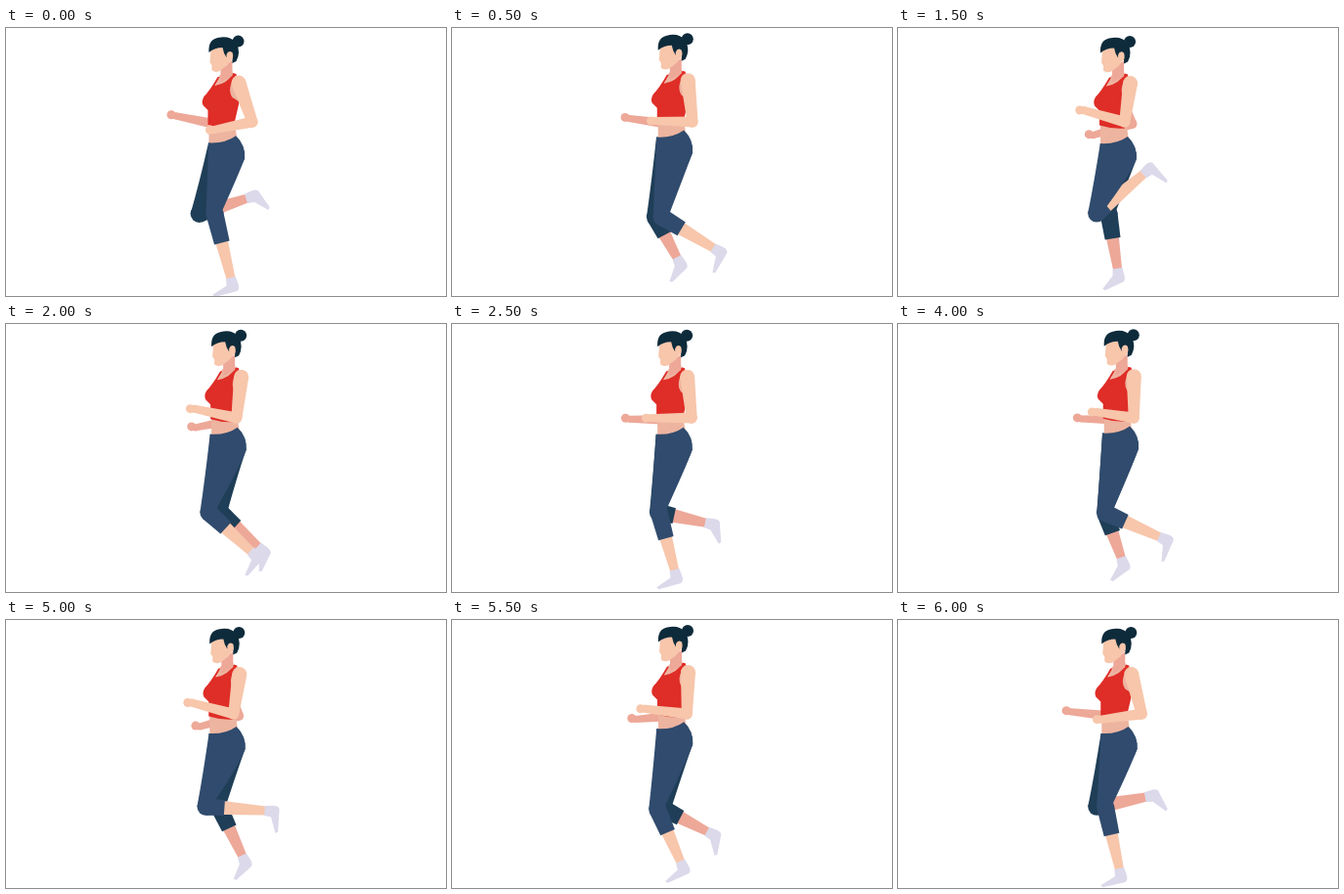
These frames come from a looping animation (450 px wide and 274 px high, 6.5 s). An HTML page with a canvas:

```html
<!DOCTYPE html>
<html lang="en">
<head>
<meta charset="utf-8">
<title>Jogging on the spot</title>
<style>
  html, body { margin: 0; width: 100%; height: 100%; overflow: hidden; background: #fff; }
  canvas { display: block; width: 450px; height: 274px; }
</style>
</head>
<body>
<canvas id="stage" width="450" height="274"></canvas>
<script>
const ctx = document.getElementById('stage').getContext('2d');
const HAIR = '#0e2b3b', SKIN = '#f7c6ab', SHADE = '#eda898', BELLY = '#edb4a0', RED = '#df2d27';
const STEP = 500, POSES = 13;
const STRIDE = 6.5;                       // steps per stride, two strides per loop
const TURN = 2 * Math.PI / STRIDE, DEG = Math.PI / 180;

// Shin angle in degrees from straight down, over one stride
const SHIN = [[0, 14], [1, 59], [1.5, 66], [2.25, 101], [3, 130],
              [3.5, 86], [4.25, 28], [5, 15], [6.25, 9], [STRIDE, 14]];

const NEAR = { delay: 0, swing: 1, shin: 63, ankle: 59, pants: '#304b6d', skin: SKIN };
const FAR = { delay: STRIDE / 2, swing: 1.9, shin: 52, ankle: 43, pants: '#1f3e57', skin: SHADE };

function shinAngle(q) {
  const i = SHIN.findIndex(key => key[0] > q);
  const [q0, a0] = SHIN[i - 1], [q1, a1] = SHIN[i];
  return a0 + (a1 - a0) * (q - q0) / (q1 - q0);
}

function fill(color, path) {
  ctx.fillStyle = color;
  ctx.fill(new Path2D(path));
}

function dot(color, x, y, r) {
  ctx.fillStyle = color;
  ctx.beginPath();
  ctx.arc(x, y, r, 0, 7);
  ctx.fill();
}

// Tapered band with flat ends
function band(color, x1, y1, r1, x2, y2, r2) {
  const len = Math.hypot(x2 - x1, y2 - y1);
  const nx = (y2 - y1) / len, ny = (x1 - x2) / len;
  fill(color, `M${x1 + nx * r1} ${y1 + ny * r1}L${x2 + nx * r2} ${y2 + ny * r2}` +
    `L${x2 - nx * r2} ${y2 - ny * r2}L${x1 - nx * r1} ${y1 - ny * r1}Z`);
}

function limb(color, x1, y1, r1, x2, y2, r2) {
  band(color, x1, y1, r1, x2, y2, r2);
  dot(color, x1, y1, r1);
  dot(color, x2, y2, r2);
}

// Foot at ankle (ax, ay); (dx, dy) points along the shin
function foot(ax, ay, dx, dy, angle) {
  const at = (along, back) => `${ax + dx * along + dy * back} ${ay + dy * along - dx * back}`;
  const ux = Math.sin(angle), uy = Math.cos(angle);
  const tx = ax + ux * 25, ty = ay + uy * 25;
  fill('#dbd9ea', `M${at(-1, -5)}L${at(-1, 5)}L${at(8, 6)}Q${at(14, 6)} ${at(14, 2)}` +
    `L${tx + uy * 1.5} ${ty - ux * 1.5}L${tx - uy * 1.5} ${ty + ux * 1.5}L${at(6, -6)}Z`);
}

function leg(side, phase, bob) {
  const q = (phase + side.delay) % STRIDE, reach = Math.cos(TURN * q);
  const angle = shinAngle(q) * DEG, dx = Math.sin(angle), dy = Math.cos(angle);
  const kx = 210 + side.swing * (5 * reach + 2 * bob), ky = 191.5 + 2 * bob;
  const len = side.shin + 3 * reach - 3 * bob;
  const ax = kx + dx * len, ay = ky + dy * len;
  const cuff = len * (0.3 + 0.15 * dy);
  const hx = kx + dx * cuff, hy = ky + dy * cuff;

  band(side.skin, kx, ky, 8, ax, ay, 4.5);
  foot(ax, ay, dx, dy, angle - side.ankle * DEG);
  band(side.pants, kx, ky, 9, hx, hy, 8);
  dot(side.pants, kx, ky, 9);

  const x = 208 + 1.2 * bob, y = 114.7 - 3.5 * bob;
  fill(side.pants, `M${x} ${y}Q${x + 17} ${y + 1} ${x + 28} ${y - 7}` +
    `Q${x + 38} ${y + 3} ${x + 37} ${y + 16}Q${x + 31} ${y + 32} ${kx + 8} ${ky - 4}` +
    `L${kx} ${ky + 4}L${kx - 9} ${ky}Q${(x + kx - 9) / 2} 158 ${x} ${y}Z`);
}

function head() {
  fill(SHADE, 'M219 41L231 33L231 49L219 55Z');
  fill(SKIN, 'M209 22L208 35L210 38L210 43Q213 46 218 44L226 38L231 30L226 18Z');
  fill(HAIR, 'M207 25Q206 12 216 10Q228 7 235 15Q240 25 235 34L231 36L231 28L225 30Q222 26 221 20Q213 20 207 25Z');
  dot(HAIR, 237, 13.5, 6);
  fill(SKIN, 'M225 27Q227 22 231 25Q233 31 229 34L225 35Z');
}

function torso() {
  fill(BELLY, 'M207 96L233 94L237 122L207 124Z');
  fill(BELLY, 'M218 48L231 44L234 56L212 63Z');
  fill(RED, 'M216 50L218 50L213 59Q226 57 232 46L235 47L238 76L232 102Q219 103 206 99L206 84L201 79Q199 75 202 70Q208 64 216 50Z');
  fill(BELLY, 'M234 49Q225 62 231 71L239 76L241 50Z');
}

function draw(phase) {
  const bob = Math.cos(2 * TURN * (phase - 1.25));
  const c = Math.cos(TURN * phase), s = Math.sin(TURN * phase);
  const dx = 2 + 2 * bob, dy = -1 - 1.5 * bob;

  ctx.fillStyle = '#fff';
  ctx.fillRect(0, 0, 450, 274);

  const fx = 182 - 13 * c + 3 * s, fy = 98 - 10 * c - bob;
  limb(SHADE, 222 + dx, 60 + dy, 6, fx + 44, 98, 5);
  limb(SHADE, fx + 44, 98, 5, fx + 4, fy + 1, 3.5);
  dot(SHADE, fx, fy, 4.5);
  leg(FAR, phase, bob);

  ctx.save();
  ctx.translate(dx, dy);
  torso();
  head();
  ctx.restore();

  leg(NEAR, phase, bob);
  const ex = 242 + 10 * c - 2 * s, ey = 96;
  const hx = 197 + 11.5 * c, hy = 93 + 10 * c - 3 * s - 1.5 * bob;
  limb(SKIN, 237.5 + dx, 56 + dy, 7.5, ex, ey, 5.5);
  limb(SKIN, ex, ey, 5.5, hx + 4, hy, 4);
  dot(SKIN, hx, hy, 4.5);
}

let shown = -1;
function tick(now) {
  const pose = Math.floor(now / STEP) % POSES;
  if (pose !== shown) draw((shown = pose) % STRIDE);
  requestAnimationFrame(tick);
}
tick(performance.now());
</script>
</body>
</html>
```
